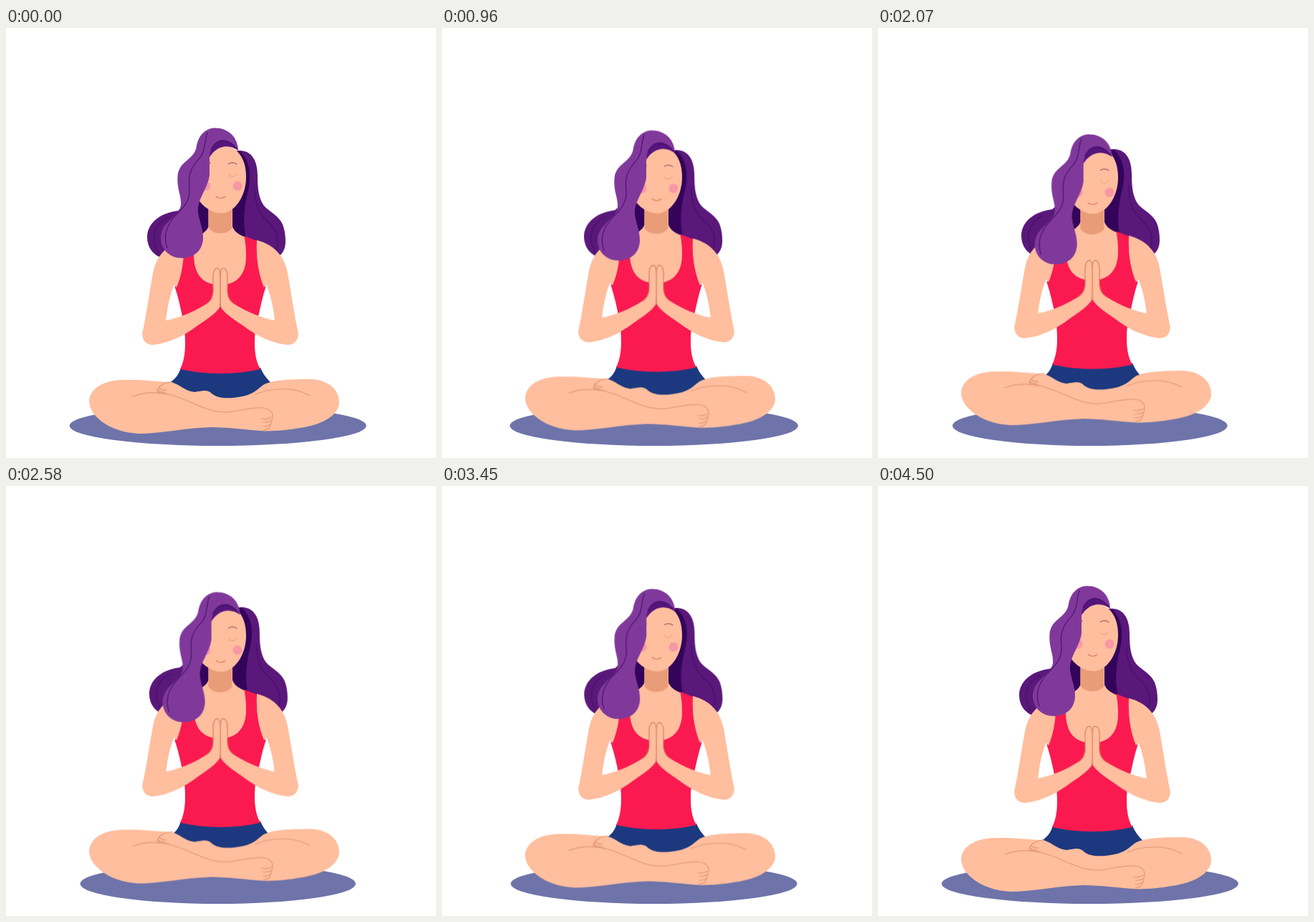
An HTML page for the animation above (4530 ms loop, 600x600 px).

```html
<!DOCTYPE html>
<html lang="en">
<head>
<meta charset="utf-8">
<title>Meditation</title>
<style>
  html, body { margin: 0; width: 100%; height: 100%; overflow: hidden; background: #fff; }
  svg { display: block; width: 100vw; height: 100vh; }
  .skin { fill: #ffbe9e; }
  .dark { fill: #5a187a; }
  .deep { fill: #33045a; }
  .line { fill: none; stroke: #e39a76; stroke-width: 1.2; stroke-linecap: round; }
  .strand { fill: none; stroke: #45106a; stroke-width: 1.1; stroke-linecap: round; }

  /* One breath: every part eases to its raised pose and back. */
  .move { animation: breathe 2265ms cubic-bezier(.37, 0, .63, 1) infinite alternate; }
  @keyframes breathe {
    from { transform: none; }
    to { transform: var(--to); }
  }
  #shadow   { --to: scaleX(.925); transform-origin: 295.7px 555px; }
  #backhair { --to: translate(3px, -2px); }
  #torso    { --to: translateY(-6.5px); }
  #neck     { --to: translateY(1.5px); }
  #legs     { --to: translateY(-12px); }
  #arms     { --to: translateY(-6.5px) scaleY(.9786); transform-origin: 0 300px; }
  #forearms { --to: translateY(-9.5px) scaleY(1.0143); transform-origin: 0 440px; }
  #face     { --to: translateY(.8px); }
  #features { --to: translateY(9px); }
  #fronthair { --to: translate(2.7px, 9px); }
</style>
</head>
<body>
<svg viewBox="0 0 600 600">
  <defs>
    <path id="arm" d="M350 296C376 303 389 320 393 342C397 364 402 398 407.500 425C408 436 402 442 392 442L373 428L375 408C373 390 369 371 363.500 358.500L360 362C353 345 349 325 350 296Z"/>
    <g id="forearm">
      <path class="skin" d="M375 408C358 405 338 397 320 386C311 380 308 374 309 360V346C309 339 306 335 303 335C300 335 299 340 299 350V388C303 397 317 406 331 415.500C350 430 372 440 392 442C403 442 408 436 407.500 425L375 400Z"/>
      <path class="line" style="stroke:#d28561" d="M318 385C311 380 308 374 309 360V346C309 339 306 335 303 335C300 335 299 340 299 350V378Q299 384 299.600 389"/>
    </g>
  </defs>

  <ellipse id="shadow" class="move" cx="295.7" cy="555" rx="207" ry="28" fill="#6e74a9"/>

  <g id="backhair" class="move">
    <path class="dark" d="M318 172C340 167 351 182 351 206C351 226 353 238 360 248C368 257 380 261 386 274C389 282 390 290 390 298C390 308 386 315 380 319L310 310V180Z"/>
    <path class="deep" d="M310 172H327C340 186 343 204 338 226C333 246 331 264 333 282L336 300H312Z"/>
    <path class="strand" d="M347 222C346 246 353 260 365 270C380 283 382 299 376 312"/>
    <path class="dark" d="M240 255C214 258 197 273 197 292C197 306 205 315 213 319L255 322L285 290V215Z"/>
    <path class="deep" d="M262 225H286V292H268Z"/>
    <path class="strand" d="M226 264C207 273 201 295 213 314"/>
  </g>

  <g id="torso" class="move">
    <path class="skin" d="M282.500 240V277C278 290 258 293 243 299V345L262 365H336L355 345V299C340 293 321 291 316 277V240Z"/>
    <path fill="#1c397f" d="M244 474H355C359 483 364 490 372 497L350 528H250L228 495C236 490 241 484 244 474Z"/>
    <path fill="#fb1a50" d="M247 299C248 325 245 345 235.500 361C240 375 243.500 389 246 403C249 418 250 428 250 440C250 454 248 466 243 476Q300 488.500 355 476C350 468 347 456 347 440C347 428 348 418 352 403C355 389 358 375 362.500 361C353 345 349 325 350 297L332.500 290C335 305 336 320 334 330C331 347 319 358.500 299 358.500C276 358.500 261 346 262 312V293Z"/>
  </g>

  <path id="neck" class="move" fill="#e99c78" d="M282.500 235V279C290 289 308 289 315.500 279V235Z"/>

  <g id="legs" class="move">
    <path class="skin" d="M116 521C117 503 136 491 165 491C190 490.500 208 493 230 494C243 497 248 506 263 508C275 506 281 504 287 510C295 517 310 518 330 514C345 511 351 504 359 498C371 491 395 490 425 490C451 491 465 505 465 523C464 541 440 554 410 558C394 561 380 562 362 562.500C336 561 310 557 287 557C250 558 215 566 185 566C143 564 116 540 116 521Z"/>
    <g class="line">
      <path d="M177 514C194 507 212 508 228 511.500C256 518 278 537 309 536C329 534 343 529 358 530C370 531 374 538 371 547C369 557 366 561 359 561"/>
      <path d="M357 545Q364 547 370 543M359 550Q365 551 370 548M359 556Q365 556 369 553"/>
      <path d="M348 511C370 502 402 500 424 513"/>
      <path d="M232 494C221 494 212 500 211 507Q216 510 227 510.500M214 502Q218 506 224 505M212 505Q217 509 222 508"/>
    </g>
  </g>

  <g id="arms" class="move skin">
    <use href="#arm"/>
    <use href="#arm" transform="matrix(-1 0 0 1 598 0)"/>
  </g>
  <g id="forearms" class="move">
    <use href="#forearm"/>
    <use href="#forearm" transform="matrix(-1 0 0 1 598 0)"/>
  </g>

  <path id="face" class="move skin" d="M303 164C323 165 335 182 335 208C335 236 318 258.500 300 258.500C285 258 272 247 266 235V200C268 180 285 164 303 164Z"/>

  <g id="features" class="move">
    <g fill="#f898a4">
      <circle cx="323" cy="220.500" r="6.500"/>
      <circle cx="279" cy="220.500" r="6.500"/>
    </g>
    <g class="line">
      <path stroke="#a8626f" d="M310.500 189.500Q316 186 322 190M281 189Q283 187 285.500 188.500"/>
      <path stroke="#eda688" d="M311 204C312 208.500 320 208.500 321 203.500"/>
      <path stroke="#e07a60" d="M293 235Q299.500 240 306 235"/>
    </g>
  </g>

  <g id="fronthair" class="move">
    <path fill="#56157c" d="M278 182L283 152H318L324 171C312 162 295 162 283.500 181Z"/>
    <path fill="#80399b" d="M292 139.500C310 139.500 323 152 324 170C309 148 286 152 284 180V205C282 224 266 239 268 257C270 271 275 279 275 294C274 312 261 321 245 321C228 321 215 308 216 291C218 269 242 263 244 247C245 234 238 225 239.500 206C242 185 261 185 265.500 167C268 150 278 139.500 292 139.500Z"/>
    <path class="strand" d="M281 146C276 160 279 172 269 183C257 196 254 206 256 224C257 241 248 250 237 261C224 275 219 291 225 307"/>
    <path class="strand" d="M286 169C293 156 309 154 321 167"/>
  </g>
</svg>
</body>
</html>
```
